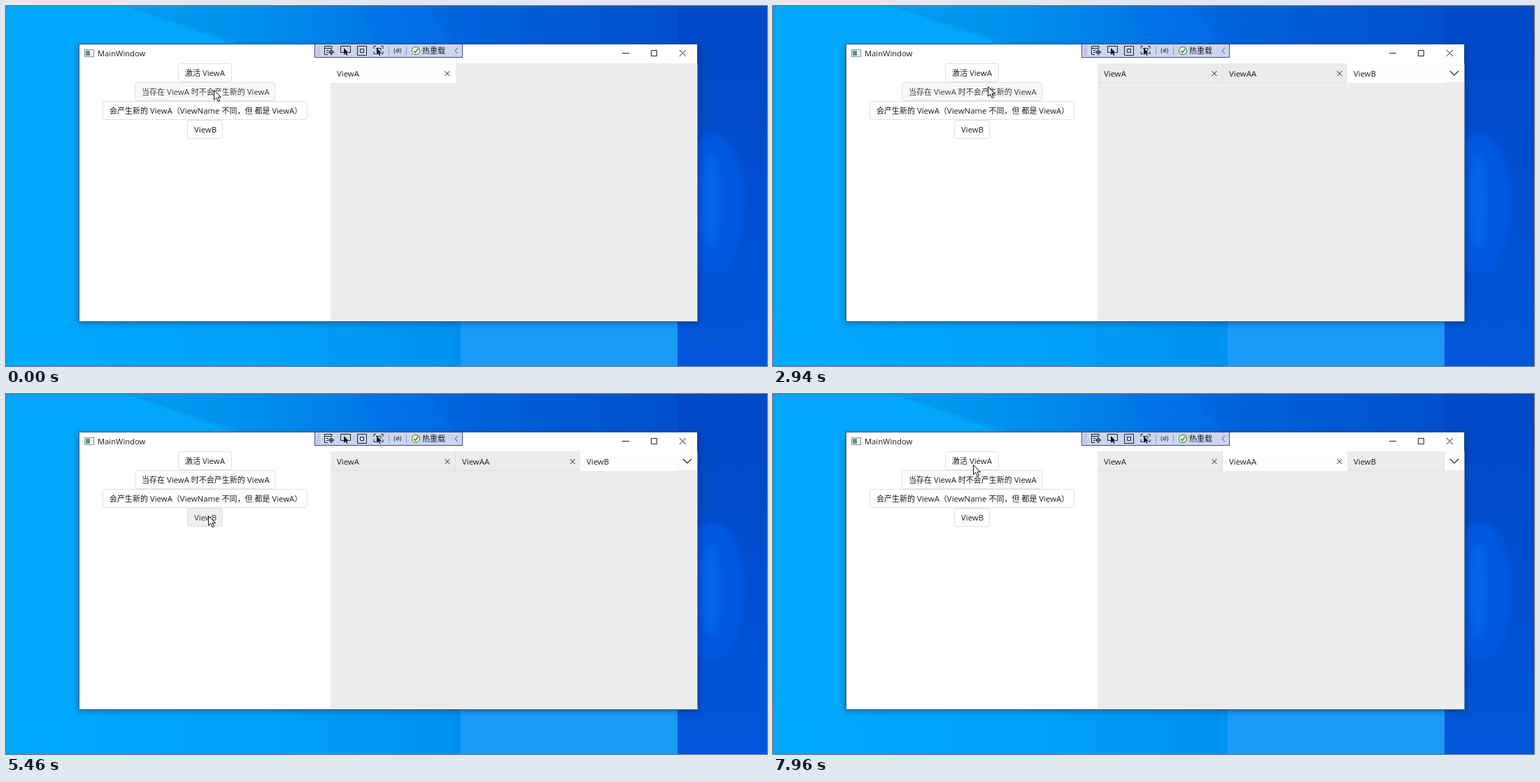
These frames come from a looping animation (1088 by 515 pixels, 8000 ms). An HTML page:

```html
<!DOCTYPE html>
<html lang="zh-CN">
<head>
<meta charset="utf-8">
<style>
  html, body { margin: 0; width: 100%; height: 100%; overflow: hidden; background: #00a2f6; }
  svg { display: block; width: 1088px; height: 515px; }
  text { font: 11.4px "Open Sans", "Noto Sans CJK SC", "Noto Sans CJK", sans-serif; fill: #1c1c1c; white-space: pre; }
  .cjk { font-size: 11px; }
  .line { fill: none; stroke: #222; }
</style>
</head>
<body>
<svg viewBox="0 0 1088 515" xmlns="http://www.w3.org/2000/svg">
  <defs>
    <linearGradient id="sky">
      <stop offset="0" stop-color="#00a8fa"/>
      <stop offset=".3" stop-color="#0092ec"/>
      <stop offset=".46" stop-color="#007ce6"/>
      <stop offset=".6" stop-color="#0062dc"/>
      <stop offset="1" stop-color="#0048c6"/>
    </linearGradient>
    <linearGradient id="floor">
      <stop offset="0" stop-color="#00aafc"/>
      <stop offset=".35" stop-color="#00a0f8"/>
      <stop offset=".6" stop-color="#0090f0"/>
      <stop offset=".88" stop-color="#0060de"/>
      <stop offset="1" stop-color="#0054d6"/>
    </linearGradient>
    <linearGradient id="side" x2="0" y2="1">
      <stop offset="0" stop-color="#0048c6"/>
      <stop offset="1" stop-color="#0056da"/>
    </linearGradient>
    <filter id="blur" x="-20%" y="-20%" width="140%" height="140%"><feGaussianBlur stdDeviation="5"/></filter>
  </defs>

  <!-- desktop -->
  <rect width="1088" height="515" fill="url(#sky)"/>
  <path d="M0 0H165L330 55H105V515H0Z" fill="#00a7fa"/>
  <path d="M165 0L330 52" stroke="#28b4fa" opacity=".5"/>
  <path d="M505 0H600L640 55H530Z" fill="#0070ec" opacity=".6" filter="url(#blur)"/>
  <path d="M0 440H1088V515H0Z" fill="url(#floor)"/>
  <rect x="960" width="128" height="515" fill="url(#side)"/>
  <ellipse cx="1011" cy="283" rx="44" ry="100" fill="#0058e2" filter="url(#blur)"/>
  <ellipse cx="1008" cy="280" rx="12" ry="66" fill="#0466ee" filter="url(#blur)"/>
  <rect x="650" y="440" width="310" height="75" fill="#1c9af8"/>

  <!-- window -->
  <rect x="104" y="58" width="886" height="395" fill="#002050" opacity=".5" filter="url(#blur)"/>
  <rect x="104.5" y="54.5" width="884" height="397" fill="#fff" stroke="#2c5a86"/>
  <rect x="464" y="82" width="524.5" height="369" fill="#ececec"/>
  <rect x="112.5" y="62.5" width="13" height="10" fill="#f4f4f4" stroke="#8b9096"/>
  <rect x="114" y="64" width="6" height="7" fill="#4c9a8c"/>
  <text x="131" y="72" style="font-size:11.2px">MainWindow</text>
  <path d="M881 67.5H891M922.5 63.5H930.5V71.5H922.5ZM963 63L972 72M972 63L963 72" class="line"/>

  <!-- debug toolbar -->
  <rect x="441.5" y="54.5" width="211" height="19" fill="#ccd5f0" stroke="#3f4c86"/>
  <path d="M444.5 57V72M448.5 57V72M446.5 58V72" stroke="#7c88b4" stroke-dasharray="1 2"/>
  <g class="line">
    <path d="M466 60V57.5H455.5V69.5H460M456 60.5H466M458 63.5H461M458 66.5H460"/>
    <circle cx="465" cy="66" r="2.6"/><path d="M465 61.5V70.5M460.5 66H469.5"/>
    <path d="M483 66.5H478.5V57.5H492.5V66.5H490"/>
    <path d="M502.5 57.5H515.5V70.5H502.5ZM506.5 61.5H511.5V66.5H506.5Z"/>
    <path d="M526 61V57.5H529M536 57.5H539V61M526 65V68.5H529M539 65V68.5H537M529 60.5H536V64"/>
    <g stroke-width=".8">
      <path d="M556 60Q553.5 64 556 68M563.5 60Q566 64 563.5 68M558 66L562 61"/>
      <circle cx="560" cy="64" r="2.2"/>
    </g>
  </g>
  <path id="mini" d="M483 60V70L485.4 67.8 487 71 488.5 70.2 487 67.2H490Z" fill="#111"/>
  <use href="#mini" x="47"/>
  <path d="M547.5 58V70M572.5 58V70" stroke="#8d99c4"/>
  <circle cx="586" cy="64" r="5.6" fill="#f4fbf2" stroke="#389838" stroke-width="1.1"/>
  <path d="M583 64L585.3 66.5 589.2 61.2" fill="none" stroke="#2c8c2c" stroke-width="1.5"/>
  <text x="595" y="68" class="cjk">热重载</text>
  <path d="M646 60L642 64 646 68" fill="none" stroke="#3f4c86"/>

  <g id="tabs"></g>
  <g id="more">
    <rect x="960" y="82" width="28" height="27" fill="#fdfdfd"/>
    <path d="M968 93L974 99 980 93" class="line" stroke-width="1.2"/>
  </g>
  <g id="buttons"></g>
  <path id="cursor" d="M.5 .5V14.2L3.7 11.2 6.2 16.6 8.4 15.6 6 10.4H10.4Z" fill="#fff" stroke="#111" stroke-linejoin="round"/>
</svg>
<script>
const LOOP = 8000, PACE = 8, TICK = 140, ROW = 27;
const $ = id => document.getElementById(id);
const clamp = v => Math.min(1, Math.max(0, v));
const ease = p => p * p * (3 - 2 * p);
const show = (node, on) => node.setAttribute("visibility", on ? "visible" : "hidden");

function add(parent, tag, attrs = {}, content = "") {
  const node = document.createElementNS("http://www.w3.org/2000/svg", tag);
  for (const key in attrs) node.setAttribute(key, attrs[key]);
  node.textContent = content;
  return parent.appendChild(node);
}

function label(parent, x, y, content) {
  const node = add(parent, "text", { x, y });
  for (const run of content.match(/[\x20-\x7e]+|[^\x20-\x7e]+/g)) {
    add(node, "tspan", run.charCodeAt(0) > 127 ? { class: "cjk" } : {}, run);
  }
  return node;
}

// The buttons are centred in one column; each one opens a tab.
const buttons = [
  { name: "激活 ViewA", width: 76, tab: 0, shade: 17 },
  { name: "当存在 ViewA 时不会产生新的 ViewA", width: 200, tab: 0, shade: 6 },
  { name: "会产生新的 ViewA（ViewName 不同，但 都是 ViewA）", width: 292, tab: 1, shade: 7 },
  { name: "ViewB", width: 50, tab: 2, shade: 16 }
];
buttons.forEach((button, i) => {
  const { width, name } = button;
  const x = 284.5 - width / 2, y = 82.5 + i * ROW;
  button.box = add($("buttons"), "rect", { x, y, width, height: 26, rx: 3.5, stroke: "#e0e0e0" });
  button.text = label($("buttons"), x + 9.5, y + 17.5, name);
});

const tabs = ["ViewA", "ViewAA", "ViewB"].map((name, i) => {
  const group = add($("tabs"), "g");
  const x = 464 + Math.round(i * 178.6);
  const width = Math.min(179, 960 - x);
  const box = add(group, "rect", { x, y: 82, width, height: 28 });
  const edge = add(group, "path", { d: `M${x} 109.5H${x + width - .5}V82`, fill: "none", stroke: "#dfdfdf" });
  label(group, x + 9, 101, name);
  if (width === 179) add(group, "path", { d: `M${x + 163.5} 93l7 7m0 -7l-7 7`, class: "line" });
  return { group, box, edge };
});

// Places the pointer visits: arrival time, x, y.
const visits = [
  [-300, 297, 120], [560, 296, 149], [830, 290, 173], [1100, 293, 152], [1500, 289, 174],
  [2800, 307, 115], [3240, 299, 102], [3630, 300, 123], [4050, 300, 150], [5160, 289, 174],
  [5900, 302, 123], [6720, 299, 102], [7700, 290, 156], [7960, 286, 101]
].map(([arrive, x, y]) => ({ arrive, x, y, button: Math.floor((y - 82) / ROW) }));

// Travel time grows with distance; a click comes 300 ms in, or just before leaving.
visits.forEach((visit, i) => {
  const next = visits[i + 1];
  visit.leave = next ? Math.max(visit.arrive + 100, next.arrive - PACE * Math.abs(next.y - visit.y)) : LOOP;
  visit.click = Math.min(visit.arrive + 300, visit.leave);
});

function pointerAt(t) {
  const i = visits.findLastIndex(v => v.arrive <= t);
  const from = visits[i];
  if (t < from.leave) return { ...from, fade: clamp((t - from.arrive) / 120) };
  const to = visits[i + 1];
  const tick = to.arrive - Math.floor((to.arrive - t) / TICK) * TICK;
  const p = ease(clamp((tick - from.leave) / (to.arrive - from.leave)));
  return { x: from.x + (to.x - from.x) * p, y: from.y + (to.y - from.y) * p, button: -1, fade: 0 };
}

function draw(t) {
  const { x, y, button, fade } = pointerAt(t);
  $("cursor").setAttribute("transform", `translate(${Math.round(x)} ${Math.round(y)})`);

  buttons.forEach(({ box, text, shade }, i) => {
    const level = i === button ? fade : 0;
    const grey = Math.round(255 - shade * level);
    box.setAttribute("fill", `rgb(${grey},${grey},${grey})`);
    text.setAttribute("opacity", 1 - .15 * level);
  });

  const opened = visits.filter(v => v.click <= t).map(v => buttons[v.button].tab);
  const selected = opened.at(-1);
  const top = Math.max(...opened);
  tabs.forEach(({ group, box, edge }, i) => {
    show(group, i <= top);
    box.setAttribute("fill", i === selected ? "#fefefe" : "#ececec");
    show(edge, i <= top && i !== selected);
  });
  show($("more"), top === 2);
}

function frame() {
  draw(performance.now() % LOOP);
  requestAnimationFrame(frame);
}
frame();
</script>
</body>
</html>
```
